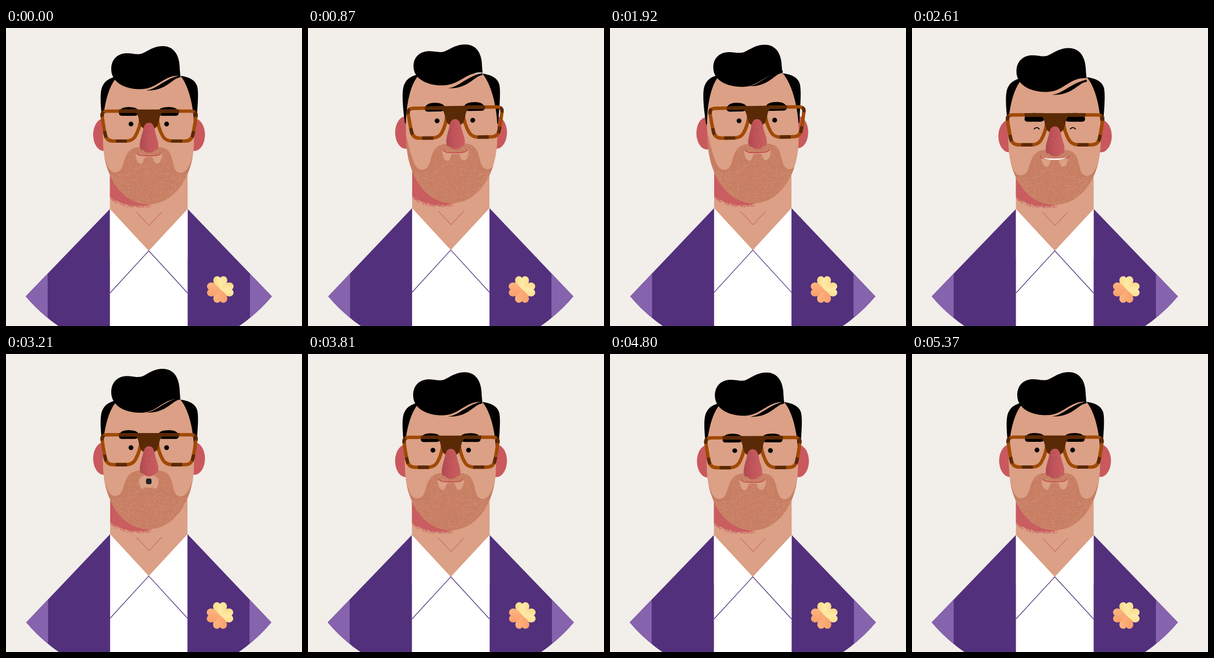
An HTML page that plays this animation: 540 by 543 pixels, repeating every 5400 ms.

```html
<!DOCTYPE html>
<html lang="en">
<head>
<meta charset="utf-8">
<title>Portrait loop</title>
<style>
html, body { margin: 0; width: 100%; height: 100%; overflow: hidden; background: #f2eeea; }
svg { display: block; width: 540px; height: 543px; }
</style>
</head>
<body>
<svg viewBox="0 0 540 543">
  <defs>
    <clipPath id="jacketClip"><path class="jacket"/></clipPath>
    <clipPath id="neckClip"><rect x="189.600" y="200" width="141.800" height="220"/></clipPath>
    <clipPath id="faceClip"><path class="face"/></clipPath>
    <clipPath id="noseClip"><use href="#noseShape"/></clipPath>
    <path id="noseShape" d="M261 172.500C267 172.500 270 178 271.500 186C273 196 278 205 278 214C278 221 275 223.500 271 222C269 229 253 229 251 222C247 223.500 244 221 244 214C244 205 248 196 250 186C251.500 178 254 172.500 261 172.500Z"/>
    <path id="petal" d="M0 0C-5-4-12.700-9-12.700-16.500C-12.700-24-4-27 0-21C4-27 12.700-24 12.700-16.500C12.700-9 5-4 0 0Z"/>
    <path id="rim" fill="none" d="M186 151.500H238Q247.500 152 246.500 162C245 178 240 190 236 197Q231 205.500 220 206H196Q184.500 206 181.500 196C179 186 177 172 175.300 160Q174.500 151.500 186 151.500Z"/>
    <g id="lens" stroke-width="6.200">
      <use href="#rim" stroke="#a04a06"/>
      <use href="#rim" stroke="#5a2906" stroke-dasharray="0 20 55 48 20 20 12 26 10 100"/>
    </g>
    <linearGradient id="noseTone">
      <stop offset="0" stop-color="#b24c53"/><stop offset=".35" stop-color="#c0545a"/><stop offset="1" stop-color="#c95d5f"/>
    </linearGradient>
    <linearGradient id="gold"><stop offset="0" stop-color="#fbd988"/><stop offset=".5" stop-color="#fdeaa6"/><stop offset="1" stop-color="#fbdd92"/></linearGradient>
    <linearGradient id="peach"><stop offset="0" stop-color="#f99f6b"/><stop offset="1" stop-color="#fdb580"/></linearGradient>
  </defs>
  <rect width="540" height="543" fill="#f2eeea"/>

  <g id="body">
    <path class="jacket" fill="#52307c"/>
    <g clip-path="url(#jacketClip)" fill="#8663ad">
      <rect x="0" y="400" width="76" height="143"/>
      <rect x="445" y="400" width="95" height="143"/>
    </g>
    <g clip-path="url(#neckClip)">
      <rect x="189" y="200" width="143" height="220" fill="#dba085"/>
      <g id="shade" fill="#c95d5f">
        <ellipse cx="242" cy="245" rx="88" ry="78"/>
        <path id="shadeGrain"/>
      </g>
    </g>
    <path id="shirt" fill="#fff"/>
    <g id="collar" fill="none">
      <path d="M189.600 483L260.500 406L331.400 483" stroke="#52307c" stroke-width="1.200"/>
      <path d="M238 335.500L261 360L284 335.500" stroke="#c4504f"/>
    </g>
    <g transform="translate(391 476.500)">
      <use href="#petal" fill="url(#gold)"/>
      <use href="#petal" fill="url(#gold)" transform="rotate(90)"/>
      <use href="#petal" fill="url(#peach)" transform="rotate(180)"/>
      <use href="#petal" fill="url(#peach)" transform="rotate(270)"/>
    </g>
  </g>

  <g id="head">
    <g fill="#c9595c">
      <ellipse cx="178" cy="194.500" rx="19" ry="29.500"/>
      <ellipse cx="344" cy="194.500" rx="19" ry="29.500"/>
    </g>
    <path d="M177 178C173 150 170 118 176 106C181 95 191 90 205 88L315 87C331 88 346 94 349 107C352 120 349 150 347 178Z"/>
    <path class="face" fill="#dba085"/>
    <g clip-path="url(#faceClip)">
      <g id="beard">
        <path fill="#c77e63" d="M150 150L168 185C174 215 179 235 183 245C188 262 197 265 204 262C216 257 213 238 224 225C231 217 240 217 250 216L272 216C286 217 293 219 298 226C307 242 303 262 318 264C330 264 336 248 340 235C346 215 350 200 352 185L372 150V345H150Z"/>
        <path id="beardGrain" fill="#e0a98d" opacity=".75"/>
        <g id="chin" fill="#dba085">
          <path d="M-24.500-4C-23 8-20 15-14 14C-8 13-10 3-5 2H5C10 3 8 13 14 14C20 15 23 8 24.500-4Q0 5-24.500-4Z"/>
          <ellipse id="lipArea" cy="0" rx="23" ry="12"/>
        </g>
      </g>
    </g>
    <g id="mouth">
      <path id="lips" fill="none" stroke="#c23f48" stroke-width="1.300" stroke-linecap="round"/>
      <path id="teeth" fill="#fff" d="M-21-2Q0 .8 21-2Q13 1.800 0 1.800Q-13 1.800-21-2Z"/>
      <rect id="gasp" x="-5" y="-5" width="10" height="10.500" rx="3.500" fill="#1f2224"/>
    </g>
    <path id="strand" d="M256 113.500C275 112 288 93 318 86V90C303 91 292 116 256 113.500Z"/>
    <path id="quiff" d="M192 75C192 55 206 46 220 46C232 46 238 49 247 47C258 43 268 33 286 33C308 33 317 52 317 75L318 87C301 85 288 95 276 102C264 109 256 111.500 243 111.500C215 111 192 98 192 75Z"/>
    <g id="front">
      <g id="brows">
        <path d="M206 155Q207 144 224 144Q239 144 242 151V155Q240 160 234 160H212Q206 160 206 155Z"/>
        <path d="M315 155Q314 144 297 144Q281 144 278 151V155Q280 160 286 160H309Q315 160 315 155Z"/>
      </g>
      <g class="eye"><circle r="4.400"/><path d="M-4.500 2Q0-3 4.500 2" fill="none" stroke="#000" stroke-width="1.800" stroke-linecap="round"/></g>
      <g class="eye"><circle r="4.400"/><path d="M-4.500 2Q0-3 4.500 2" fill="none" stroke="#000" stroke-width="1.800" stroke-linecap="round"/></g>
      <use href="#lens"/>
      <use href="#lens" transform="translate(522 0) scale(-1 1)"/>
      <path fill="#5a2906" d="M228 148.400H294L286 154C280 157 280 168 276 179L270 184C268 177 254 177 252 184L246 179C242 168 242 157 236 154Z"/>
      <use href="#noseShape" fill="url(#noseTone)"/>
      <path id="noseGrain" fill="#a3434b" opacity=".6" clip-path="url(#noseClip)"/>
    </g>
  </g>
</svg>
<script>
const LOOP = 5400;
const $ = id => document.getElementById(id);
const all = name => [...document.querySelectorAll('.' + name)];
const set = (el, name, value) => el.setAttribute(name, value);
const move = (el, value) => set(el, 'transform', value);

// h: head, f: facial features relative to the head, q: quiff
const rest = {
  hx: 0, hy: 0, hr: 0, hs: 1, fx: 0, fy: 0, fr: 0, qx: 0, qy: 0, qs: 1,
  strand: 0, brow: 0, left: 1, right: 1, width: 21.5, teeth: 0, gasp: 0
};
const pose = (changes, base = rest) => ({ ...base, ...changes });
const dip = pose({ hy: 2, fx: 2, fy: 2, left: 0, right: 0 });
const look = pose({ hy: -4, fx: 9, fy: -2.4, fr: -1, qx: .5, qy: 1, qs: .95, brow: -2 });
const lookUp = pose({ hy: -5, qy: -.5, qs: .97 }, look);
const tilt = pose({ hx: -.5, hy: -3.7, hr: -.8, fx: 9.6, fy: -2.7, fr: -.3, qx: -.5, qy: 1.5, qs: .97, strand: -4 }, look);
const grin = pose({ hy: 2.5, hs: 1.014, fy: 4.3, qx: -.5, qy: 1, qs: 1.02, strand: 5.5, brow: 4, left: 0, right: 0, width: 26, teeth: 1 });
const jump = pose({ hy: -8, fy: -2, qy: -4, qs: 1.03, strand: -3, brow: -5, gasp: 1 });
const gasp = pose({ hy: -4, fy: -.4, qy: -2, qs: 1.02, strand: -3, brow: -.8, gasp: 1 });
const wink = pose({ hx: -1, hy: 9.5, hr: -2, hs: 1.018, fx: .5, fy: 4, fr: -1, qy: 3, strand: .5, brow: 3, left: 0, width: 18 });

const keys = [
  [0, rest], [120, rest], [330, dip], [690, lookUp], [870, look], [1260, look],
  [1780, lookUp], [1920, tilt], [2190, tilt], [2400, rest], [2610, grin], [2700, grin],
  [2990, jump], [3210, gasp], [3540, gasp], [3780, rest], [4140, wink], [4500, wink],
  [4860, rest], [LOOP, rest]
];

function poseAt(t) {
  const i = keys.findIndex(k => k[0] > t);
  const [t0, a] = keys[i - 1], [t1, b] = keys[i];
  const u = (t - t0) / (t1 - t0), e = u * u * (3 - 2 * u);
  const p = {};
  for (const k in rest) p[k] = a[k] + (b[k] - a[k]) * e;
  return p;
}

let seed = 7;
const rnd = () => (seed = seed * 16807 % 2147483647) / 2147483647;
const grain = (count, size, place) => Array.from({ length: count }, () => {
  const [x, y] = place();
  return `M${x.toFixed(1)} ${y.toFixed(1)}h${size}v${size}h-${size}z`;
}).join('');

// Keeps light grain off the bare cheeks and upper face.
function beardPoint() {
  const x = 172 + rnd() * 178;
  const top = x > 222 && x < 300 ? 219 : 266;
  return [x, top + rnd() * (328 - top)];
}
set($('beardGrain'), 'd', grain(1900, .9, beardPoint));
set($('noseGrain'), 'd', grain(260, .9, () => [246 + rnd() * rnd() * 26, 178 + rnd() * 50]));
set($('shadeGrain'), 'd', grain(420, 1.1, () => {
  const x = 190 + rnd() * 75, k = (x - 242) / 88;
  return [x, 244 + 78 * Math.sqrt(1 - k * k) + rnd() * rnd() * 8 - 1];
}));

const eyes = all('eye');
const turn = (x, y, r) => `translate(${x} ${y}) rotate(${r} 260 260)`;

function drawFace(p) {
  const s = p.fx * .25, jaw = 321 - p.hy * .55;
  const d = `M${177 + s} 205C${174 + s} 165 182 110 203 89L318 87C338 110 ${346 + s} 165 ${343 + s} 205` +
    `C${343 + s} 270 ${308 + s} ${jaw} ${260 + s} ${jaw}S${177 + s} 270 ${177 + s} 205Z`;
  all('face').forEach(el => set(el, 'd', d));
}

function drawBody(p) {
  const b = p.hy < 0 ? p.hy * .37 : Math.max(0, p.hy - 2.5) * .28;
  const y = 329.7 + b;
  move($('body'), `translate(260.5 0) scale(${1 + Math.min(0, b) * .003} 1) translate(-260.5 0)`);
  all('jacket').forEach(el => set(el, 'd', `M189.6 ${y}L36 489A293 293 0 0 0 485 489L331.4 ${y}Z`));
  set($('shirt'), 'd', `M189.6 ${y}L260.5 ${406 + b}L331.4 ${y}V543H189.6Z`);
  move($('collar'), `translate(0 ${b})`);
  move($('shade'), `translate(0 ${p.hy * .3})`);
}

function drawMouth(p) {
  const w = p.width, o = p.gasp;
  const gasping = o > .45;
  move($('mouth'), `${turn(p.fx, p.fy * .7, p.fr)} translate(260.5 ${233 + o * 3})`);
  move($('chin'), `translate(260.5 ${233 + o * 3}) scale(${1 - .25 * o} 1)`);
  set($('lips'), 'd', `M${-w} -5C${2 - w} -.5 ${8 - w} 0 0 0S${w - 2} -.5 ${w} -5`);
  $('lips').style.display = gasping ? 'none' : '';
  $('gasp').style.display = gasping ? '' : 'none';
  set($('lipArea'), 'opacity', gasping ? 1 : 0);
  set($('teeth'), 'opacity', p.teeth);
}

function draw(t) {
  const p = poseAt(t);
  drawBody(p);
  drawFace(p);
  drawMouth(p);
  move($('head'), `${turn(p.hx, p.hy, p.hr)} translate(260.5 0) scale(${p.hs} 1) translate(-260.5 0)`);
  move($('beard'), turn(p.fx, p.fy * .7, p.fr));
  move($('front'), turn(p.fx, p.fy, p.fr));
  move($('brows'), `translate(0 ${p.brow})`);
  move($('strand'), `translate(0 ${p.strand})`);
  move($('quiff'), `translate(${p.qx} ${33 + p.qy}) scale(1 ${p.qs}) translate(0 -33)`);
  [p.left, p.right].forEach((open, i) => {
    const [dot, lid] = eyes[i].children;
    move(eyes[i], `translate(${i ? 293 : 228} 175)`);
    move(dot, `scale(1 ${open})`);
    dot.style.display = open > .3 ? '' : 'none';
    lid.style.display = open > .3 ? 'none' : '';
  });
}

const start = performance.now();
function tick() {
  draw((performance.now() - start) % LOOP);
  requestAnimationFrame(tick);
}
tick();
</script>
</body>
</html>
```
